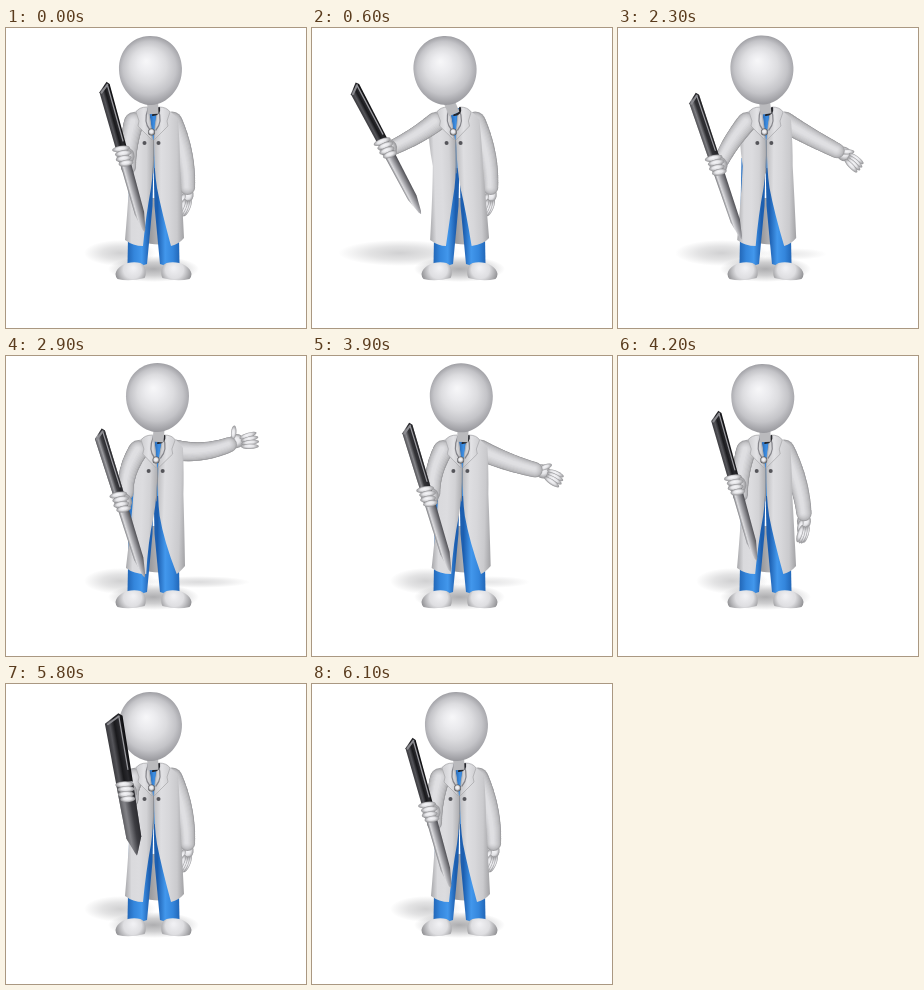
Recreate the animation shown at these times as an HTML page with a canvas. Size 300 by 300 pixels, loop 7100 ms.

```html
<!DOCTYPE html>
<html>
<head>
<meta charset="utf-8">
<style>
html, body { margin: 0; height: 100%; overflow: hidden; background: #fff; }
canvas { display: block; }
</style>
</head>
<body>
<canvas id="stage" width="300" height="300"></canvas>
<script>
const c = document.getElementById('stage').getContext('2d');
const TAU = Math.PI * 2, DEG = Math.PI / 180;
const LOOP = 7100, STEP = 100;

const mix = (a, b, t) => a + (b - a) * t;
const gray = v => `rgb(${v | 0},${v | 0},${(v | 0) + 3})`;
const part = (t, a, b) => Math.min(1, Math.max(0, (t - a) / (b - a)));
const smooth = p => p * p * (3 - 2 * p);
const out = p => Math.sin(p * Math.PI / 2);

function shades(g, colors) {
  colors.forEach((color, i) => g.addColorStop(i / (colors.length - 1), color));
  return g;
}

const across = (x0, x1, ...colors) => shades(c.createLinearGradient(x0, 0, x1, 0), colors);

function fill(path, style) {
  c.fillStyle = style;
  c.fill(new Path2D(path));
}

function line(path, color, width) {
  c.strokeStyle = color;
  c.lineWidth = width;
  c.stroke(new Path2D(path));
}

function dot(x, y, r, color) {
  c.fillStyle = color;
  c.beginPath();
  c.arc(x, y, r, 0, TAU);
  c.fill();
}

// Runs a drawing in a moved and turned frame
function at(x, y, turn, paint) {
  c.save();
  c.translate(x, y);
  c.rotate(turn);
  paint();
  c.restore();
}

function ball(x, y, rx, ry, turn = 0, lo = 145) {
  at(x, y, turn, () => {
    c.scale(rx, ry);
    dot(0, 0, 1, shades(c.createRadialGradient(-.1, -.25, 0, 0, 0, 1),
      [gray(246), gray(228), gray(lo)]));
  });
}

function shadow(x0, x1, y, ry, alpha) {
  at((x0 + x1) / 2, y, 0, () => {
    c.scale((x1 - x0) / 2, ry);
    dot(0, 0, 1, shades(c.createRadialGradient(0, 0, 0, 0, 0, 1),
      [1, .6, 0].map(k => `rgba(75,75,80,${alpha * k})`)));
  });
}

// Rounded sleeve along a quadratic curve, lit from the upper left
function sleeve(x0, y0, x1, y1, x2, y2, r0, r1) {
  for (let k = 0; k < 8; k++) {
    const color = gray(mix(160, 223, Math.sqrt(k / 7)));
    for (let t = 0; t <= 1; t += .025) {
      const u = 1 - t;
      dot(u * u * x0 + 2 * u * t * x1 + t * t * x2 - k * .15,
          u * u * y0 + 2 * u * t * y1 + t * t * y2 - k * .15,
          mix(r0, r1, t) * (1 - k * .11), color);
    }
  }
}

function legs() {
  fill('M135 170 H166 V215 Q150 219 135 213 Z', across(135, 166, gray(125), gray(175), gray(135)));
  for (const side of [-1, 1]) {
    c.save();
    c.translate(147.5, 0);
    c.scale(side, 1);
    fill('M0 130 H24 L26 236 Q16 240 6.5 236 L1 178 Z',
      across(4, 27, '#1d5fb0', '#4297ec', '#3486dc', '#1f62b2'));
    fill('M38 246 C37 237 23 232 13 235 C7 237 7 248 9 250 Q24 254 36 251 Q38 249 38 246 Z',
      shades(c.createRadialGradient(20, 240, 1, 22, 243, 17),
        [gray(240), gray(222), gray(140)]));
    c.restore();
  }
}

// Upper body slants sideways while the feet stay put
function slanted(lean, paint) {
  c.save();
  c.transform(1, 0, -lean / 150, 1, 240 * lean / 150, 0);
  paint();
  c.restore();
}

function coat(lean) {
  fill('M141 80 H155 L150 140 H146 Z', across(141, 155, '#1b4f93', '#3d8fe4', '#1f5ca5'));
  fill(`M138 79 Q125 83 121 92 Q120 114 124 138 Q123 165 119 212 Q127 218 ${137 + lean / 2} 218
    Q140 187 145 160 Q148 140 147 112 L143 82 Z`,
    across(118, 148, gray(160), gray(218), gray(220), gray(210), gray(170)));
  fill(`M155 79 Q167 83 172 92 Q174 118 174 138 Q176 170 178 210 Q173 216 ${165 + lean} 218
    Q156 185 151 160 Q148 142 148 112 L151 82 Z`,
    across(147, 179, gray(185), gray(222), gray(215), gray(202), gray(155)));
  line('M147.5 112 Q148 130 147 145', gray(145), 1);
  for (const x of [138.5, 152.5]) dot(x, 115, 2, '#55555a');
}

function collar() {
  for (const side of [-1, 1]) {
    c.save();
    c.translate(147, 0);
    c.scale(side, 1);
    const lapel = 'M6 79 Q14 79 17 84 L14 93 L15 98 L1 112 Q2 96 4 86 Z';
    fill(lapel, across(1, 17, gray(196), gray(226), gray(205)));
    line(lapel, gray(172), .8);
    line('M5 81 Q10 94 3 102', '#85858b', 1.2);
    c.restore();
  }
  line('M147 87 Q154 86 153 80', '#25262b', 2.2);
  ball(145.5, 104, 3.5, 3.5, 0, 80);
}

function head(x, y, neckX) {
  c.lineCap = 'butt';
  line(`M${x + 2} ${y + 27} L${neckX} 86`, gray(186), 11);
  c.lineCap = 'round';
  c.save();
  c.translate(x, y);
  c.rotate((x - neckX) * .012);
  fill('M-31.5 -1 C-31.5 -20 -18 -34 0 -34 S31.5 -20 31.5 -1 C31.5 20 15 35 0 35 S-31.5 20 -31.5 -1 Z',
    shades(c.createRadialGradient(-4, -9, 1, 0, 0, 35),
      ['#f6f6f8', '#ebebee', '#dcdcdf', '#c4c4c8', '#98989d']));
  c.restore();
}

function pen(len, w, dark, shine) {
  const h = w / 2, b = h * .8, split = len * .48, cone = len * .87;
  const layer = (path, alpha, ...colors) => {
    c.globalAlpha = alpha;
    fill(path, across(-h, h, ...colors));
    c.globalAlpha = 1;
  };
  const body = `M${-h * .9} ${split} H${h * .9} L${b} ${cone} L1.5 ${len - 3} L0 ${len} L-1.5 ${len - 3} L${-b} ${cone} Z`;
  const cap = `M${-h} 5 L${h * .6} -3 L${h} 0 L${h * .9} ${split} H${-h * .9} Z`;
  layer(body, 1, '#55565b', '#dcdcdf', '#a5a5aa', '#737378', '#3d3d42');
  layer(body, dark * .85, '#4a4a4e', '#75757a', '#303035', '#222226');
  layer(cap, 1, '#37373b', '#55555a', '#19191c', '#2a2a2e', '#08080a');
  layer(cap, shine * .55, '#77777c', '#d8d8dc', '#636368', '#25252a', '#55555a');
  line(`M${h * .6} 1 L${h * .6} ${split * .8}`, '#9c9ca1', 1.2);
  line(`M${-h * .7} 6 L${h * .6} 0`, '#8c8c91', 2);
  line(`M${-h * .8} ${split} H${h * .8}`, '#cfcfd3', 2);
}

function openHand(open) {
  ball(6, -2 * open, 8, 7);
  ball(mix(11, 5, open), mix(4, -11, open), 7, 2.7, mix(.3, -1.3, open));
  for (let i = -1.5; i < 2; i++)
    ball(20 - Math.abs(i), mix(2, 3.7, open) * i, 9, 2.6, mix(.25, i * .1, open));
}

function draw(ms) {
  const t = Math.floor(ms / STEP) * STEP;
  const reach = out(part(t, 200, 900)) - smooth(part(t, 1800, 2600));
  const show = smooth(part(t, 1800, 2700)) - out(part(t, 3800, 4300));
  const aim = smooth(part(t, 4800, 5300)) - smooth(part(t, 5700, 6100));
  const swing = reach * reach;

  c.fillStyle = '#fff';
  c.fillRect(0, 0, 300, 300);
  c.lineCap = c.lineJoin = 'round';

  shadow(78 - 66 * reach, 150, 225, 13, .26);
  shadow(140, 160 + 84 * show, 226, 6, .2 * show);
  shadow(102, 193, 241, 13, .45);
  legs();

  const lean = 5 * show - 6 * reach;

  // Free arm lifts sideways and opens its hand
  const angle = mix(77, -6, show) * DEG, len = mix(69, 56, show), bow = mix(-4, 4, show);
  const ux = Math.cos(angle), uy = Math.sin(angle);
  const sx = 166 + lean * .6, sy = 94;
  const ex = sx + ux * len, ey = sy + uy * len;
  at(ex, ey, angle + mix(22, -4, show) * DEG, () => openHand(show));
  sleeve(sx, sy, sx + ux * len / 2 - uy * bow * 2, sy + uy * len / 2 + ux * bow * 2, ex, ey, 10.5, 7.5);

  slanted(lean, () => coat(lean));

  // Pen arm follows the fist
  const fx = 117.5 - 55.5 * reach - 2.5 * show + 3 * aim;
  const fy = 128 - 13 * swing + 18 * show - 24 * aim;
  const wx = fx + 5, wy = fy + 12 - 15 * reach - 20 * show - 4 * aim;
  const ax = 128 + lean * .9;
  sleeve(ax, 94, (ax + wx) / 2 - 4 + 6 * reach - 4 * show, (94 + wy) / 2 + 4 * reach, wx, wy, 10, 7.5);
  slanted(lean, collar);
  head(144.5 - 14.5 * reach + 7 * show, 42 - show, 147 + lean);

  const tilt = (74.4 - 20 * swing - 1.8 * show + 7 * aim) * DEG - Math.PI / 2;
  const size = 152 - 13 * swing - 14 * aim;
  ball(fx + 2, fy, 9, 9, tilt);
  at(fx, fy, tilt, () => {
    c.translate(0, -size * mix(.48, .55, aim));
    pen(size, 12 + 8 * aim, Math.min(1, aim * 2), show);
  });
  at(fx, fy, tilt, () => {
    for (let i = 0; i < 4; i++) ball(i % 2 - .5, -7.5 + i * 5, 9 - i * .5, 3.2, .12);
  });
}

function frame(now) {
  draw(now % LOOP);
  requestAnimationFrame(frame);
}
frame(0);
</script>
</body>
</html>
```
